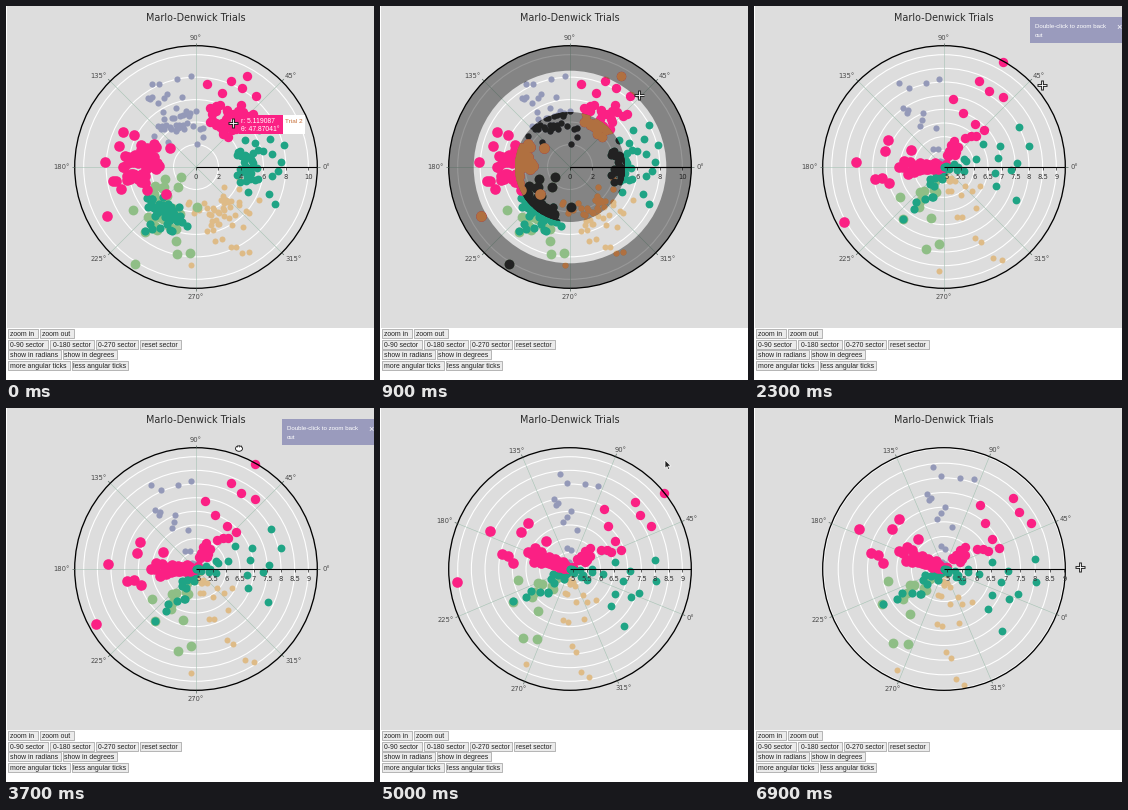
A matplotlib script that plays this animation: 368 px wide and 374 px high, repeating every 7.1 s.

```python
import numpy as np
import matplotlib.pyplot as plt
from matplotlib.animation import FuncAnimation
from matplotlib.patches import Circle, Ellipse, Polygon, Rectangle, Wedge

W, H, DPI = 368, 374, 100
CX, CY, R = 190, 161, 121.3
STEP, FRAMES = 100, 71
NEAR, FAR, FINAL = 4.89, 9.33, 9.03
SANS, UI = "DejaVu Sans", "Liberation Sans"
PINK, TEAL, GREEN = "#fb2084", "#1fa485", "#8fbe86"
PURPLE, TAN = "#9499b8", "#debb87"
BROWN, DARK = "#b07040", "#222222"

fig = plt.figure(figsize=(W / DPI, H / DPI), dpi=DPI, facecolor="white")
ax = fig.add_axes([0, 0, 1, 1])


def px(v):
    return v * 72 / DPI


def trial(color, size, dim, count, r, dr, theta, dtheta, far):
    """Far points are stage positions in the zoomed view; the rest is a cloud."""
    rng = np.random.default_rng(int(theta) + count)
    rs = np.clip(rng.normal(r, dr, count), 1.6, 6.4)
    ts = np.radians(rng.normal(theta, dtheta, count))
    dx, dy = np.array(far).T - np.array([[CX], [CY]])
    far_r = NEAR + np.hypot(dx, dy) * (FAR - NEAR) / R
    return (color, size, dim, np.append(far_r, rs),
            np.append(np.arctan2(-dy, dx), ts))


TRIALS = [
    trial(TAN, 3.0, BROWN, 40, 4.6, .9, 300, 16,
          [(185, 265), (239, 252), (248, 254), (221, 232), (227, 236),
           (208, 211), (222, 202), (203, 211), (218, 185), (226, 180)]),
    trial(PURPLE, 3.1, DARK, 38, 4.5, .9, 114, 15,
          [(185, 73), (172, 77), (145, 77), (155, 82), (149, 102), (154, 104),
           (153, 107), (169, 107), (168, 114), (182, 122), (166, 120)]),
    trial(GREEN, 4.9, DARK, 26, 4.5, .9, 230, 18,
          [(112, 284), (172, 243), (185, 238), (176.5, 212), (149, 213),
           (165, 201), (146, 191)]),
    trial(TEAL, 4.1, DARK, 36, 5.0, .6, 234, 13,
          [(149, 212.5), (162, 196), (160, 203)]),
    trial(PINK, 4.7, BROWN, 32, 5.0, .8, 56, 11,
          [(248.5, 55.5), (225, 75), (235, 85), (249, 91), (199, 92.5),
           (209, 107), (221, 118), (230, 124), (222, 130)]),
    trial(PINK, 5.3, BROWN, 48, 4.8, .9, 179, 13,
          [(90, 215.5), (102, 156), (133.5, 134), (131, 145), (121, 172.5),
           (128, 172), (135, 177), (157, 144), (145, 161), (150, 155)]),
    trial(TEAL, 3.9, DARK, 36, 4.8, .8, 0, 14,
          [(265, 121), (274.5, 140), (229, 138), (246, 140), (244, 152),
           (263, 157), (257, 164), (241, 167), (242, 180), (261.5, 194)]),
]

BUTTONS = [
    (322, [("zoom in", 1, 32), ("zoom out", 33, 68)]),
    (333, [("0-90 sector", 1, 42), ("0-180 sector", 43, 88),
           ("0-270 sector", 89, 132), ("reset sector", 133, 175)]),
    (343.5, [("show in radians", 1, 55), ("show in degrees", 56, 111)]),
    (354, [("more angular ticks", 1, 64), ("less angular ticks", 65, 122)]),
]

# start time, cursor shape, x, y
CURSOR = [
    (0, "cross", 227, 117), (1500, "cross", 262, 86),
    (3700, "hand", 233, 40), (4000, "hand", 288, 96), (4300, "hand", 258, 52),
    (4700, "arrow", 285, 53), (5000, "arrow", 285, 52),
    (5200, "arrow", 341, 217), (5400, "arrow", 298, 147),
    (5600, "cross", 303, 146), (5700, "cross", 312, 150),
    (6100, "cross", 316, 156), (6300, "cross", 321, 157),
    (6400, "cross", 326, 158), (6500, "cross", 329, 158),
    (6600, "cross", 332, 158), (6700, "cross", 331, 158),
    (6900, "cross", 326, 159),
]


def text(x, y, s, size, color="black", font=UI, ha="center", alpha=1):
    """y is the middle of the capitals."""
    ax.text(x, y + size * .36, s, fontsize=px(size), color=color, family=font,
            ha=ha, va="baseline", alpha=alpha)


def line(xs, ys, color, width):
    ax.plot(xs, ys, color=color, lw=px(width), solid_capstyle="butt")


def box(x0, y0, x1, y1, color, edge="none", alpha=1):
    ax.add_patch(Rectangle((x0, y0), x1 - x0, y1 - y0, fc=color, ec=edge,
                           lw=px(.7), alpha=alpha))


def ring(radius, color, width):
    ax.add_patch(Circle((CX, CY), radius, fill=False, ec=color, lw=px(width)))


def at(radius, angle):
    return CX + radius * np.cos(angle), CY - radius * np.sin(angle)


def draw_page():
    box(1, 0, W, 322, "#dddddd")
    text(CX, 11.3, "Marlo-Denwick Trials", 9.6, "#2b2b2b", SANS)
    for y, row in BUTTONS:
        for label, x0, x1 in row:
            box(x0 + .5, y + .5, x1 - .5, y + 9.7, "#ebebeb", "#9c9c9c")
            text((x0 + x1) / 2, y + 5.2, label, 6.85, "#222222")


def draw_points(lo, hi, rot, clip=None):
    for color, size, dim, r, theta in TRIALS:
        seen = (r >= lo) & (r <= hi)
        x, y = at((r[seen] - lo) * R / (hi - lo), theta[seen] + rot)
        dots = ax.scatter(x, y, s=px(2 * size) ** 2, linewidths=0, zorder=2,
                          color=dim if clip else color)
        if clip:
            dots.set_clip_path(clip)


def draw_chart(lo, hi, rot):
    scale = R / (hi - lo)
    step = 2 if lo == 0 else .5
    ticks = np.arange(np.ceil(lo / step) * step, hi + .001, step)
    angles = np.radians(np.arange(0, 360, 45))
    for v in ticks:
        ring((v - lo) * scale, "white", 1.1)
    for a in angles + rot:
        (x0, y0), (x1, y1) = at(0, a), at(R, a)
        line([x0, x1], [y0, y1], "#a9c4b6", .6)
    draw_points(lo, hi, rot)
    ring(R, "black", 1.3)
    line([CX, CX + R], [CY, CY], "black", 1.1)
    for v in ticks:
        x = CX + (v - lo) * scale
        line([x, x], [CY, CY + 3], "#222222", .7)
        text(x, 170.3, f"{v:g}", 6.75, "#333333", SANS)
    for a in angles:
        d = a + rot
        (x0, y0), (x1, y1) = at(R, d), at(R + 3, d)
        line([x0, x1], [y0, y1], "#55685f", .7)
        label = f"{np.degrees(a):.0f}°"
        half = (.636 * (len(label) - 1) + .5) * 6.75 / 2
        x, y = at(R + 4.8, d)
        x += half * np.clip(1.4 * np.cos(d), -1, 1)
        text(x, y - 3 * np.sin(d), label, 6.75, "#4a4a4a", SANS)


def draw_zoom(lo, hi, rot, inner, outer):
    """Darken all but the selected band."""
    areas = [Circle((CX, CY), inner),
             Wedge((CX, CY), R, 0, 360, width=R - outer)]
    for area in areas:
        area.set(fc="black", ec="none", alpha=.4, zorder=3)
        ax.add_patch(area)
        before = len(ax.collections)
        draw_points(lo, hi, rot, area)
        for dots in ax.collections[before:]:
            dots.set_zorder(4)
    line([CX, CX + R], [CY, CY], "black", 1.1)
    ax.lines[-1].set_zorder(5)


def draw_hover(x0, y0, x1, tip, first, second):
    y1 = y0 + 18.5
    mid = (y0 + y1) / 2
    box(x1, y0 - .5, x1 + 21.5, y1, "white")
    box(x0, y0, x1, y1, PINK)
    ax.add_patch(Polygon([(tip, mid), (x0, mid - 3.4), (x0, mid + 3.4)],
                         fc=PINK, ec="none"))
    text(x0 + 2.5, y0 + 5.2, first, 6.8, "white", ha="left")
    text(x0 + 2.5, y0 + 14, second, 6.8, "white", ha="left")
    text(x1 + 10.7, y0 + 5.2, "Trial 2", 6.5, "#c8713a")


def draw_notice(alpha):
    box(276, 11, W, 37, "#9a9bbd", alpha=alpha)
    for y, s in ((20, "Double-click to zoom back"), (28.3, "out")):
        text(281, y, s, 6.2, "white", ha="left", alpha=alpha)
    text(364.8, 20.5, "×", 9, "white", alpha=alpha)


def draw_cursor(shape, x, y):
    if shape == "cross":
        for color, width, arm in (("#222222", 2.8, 5), ("white", .9, 4.2)):
            line([x - arm, x + arm], [y, y], color, width)
            line([x, x], [y - arm, y + arm], color, width)
    elif shape == "hand":
        ax.add_patch(Ellipse((x, y + .6), 7, 5.4, fc="white", ec="#222222",
                             lw=px(.9)))
        for dx in (-1.6, 0, 1.6):
            line([x + dx, x + dx], [y - 2.6, y - .6], "#222222", .6)
    else:
        pts = np.array([(0, 0), (0, 8.4), (2, 6.6), (3.4, 9.8), (4.8, 9.2),
                        (3.4, 6.1), (6, 6)])
        ax.add_patch(Polygon(pts + (x, y), fc="#222222", ec="white",
                             lw=px(.7)))
    for art in (ax.lines + ax.patches)[-0:]:
        if art.get_zorder() < 3 and art in ax.lines[-4:]:
            art.set_zorder(6)


def cursor_at(t, outer):
    if 300 <= t < 1500:
        return ("cross", *at(outer + 3.5, np.radians(46)))
    if 1700 <= t < 3700:
        u = min((t - 1600) / 700, 1)
        return "cross", 262 + 26 * u, 86 - 7 * u
    return [c for c in CURSOR if c[0] <= t][-1][1:]


def view(t):
    lo, hi = (0, 10.8) if t < 1500 else (NEAR, FAR)
    if t >= 6500:
        hi = np.interp(t, [6400, 6700, 6900], [FAR, 9.08, FINAL])
        if t < 6900:
            hi = max(hi, 9.08)
    rot = 0 if t < 4300 else -12 if t < 4700 else -22
    return lo, hi, np.radians(rot)


def draw(i):
    t = i * STEP
    ax.clear()
    ax.set(xlim=(0, W), ylim=(H, 0))
    ax.axis("off")

    outer = np.interp(t, [200, 900, 1000, 1200], [55, 96.3, 101, 105])
    state = view(t)
    draw_page()
    draw_chart(*state)
    if 300 <= t < 1500:
        draw_zoom(*state, 55, outer)

    if t < 300:
        draw_hover(232.5, 109, 277, 228.6, "r: 5.119087", "θ: 47.87041°")
    elif 1500 <= t < 1700:
        draw_hover(257, 81.8, 298.5, 252, "r: 8.227325", "θ: 49.68908°")

    if 1700 <= t < 5000:
        draw_notice(.5 if t >= 4700 else min((t - 1600) / 400, 1))
    draw_cursor(*cursor_at(t, outer))
    return []


# Paint in call order unless a zorder says otherwise.
for kind in (Circle, Ellipse, Polygon, Rectangle, Wedge):
    kind.zorder = 2

anim = FuncAnimation(fig, draw, frames=FRAMES, interval=STEP,
                     init_func=lambda: [], repeat=True, repeat_delay=0,
                     blit=False)
plt.show()
```
